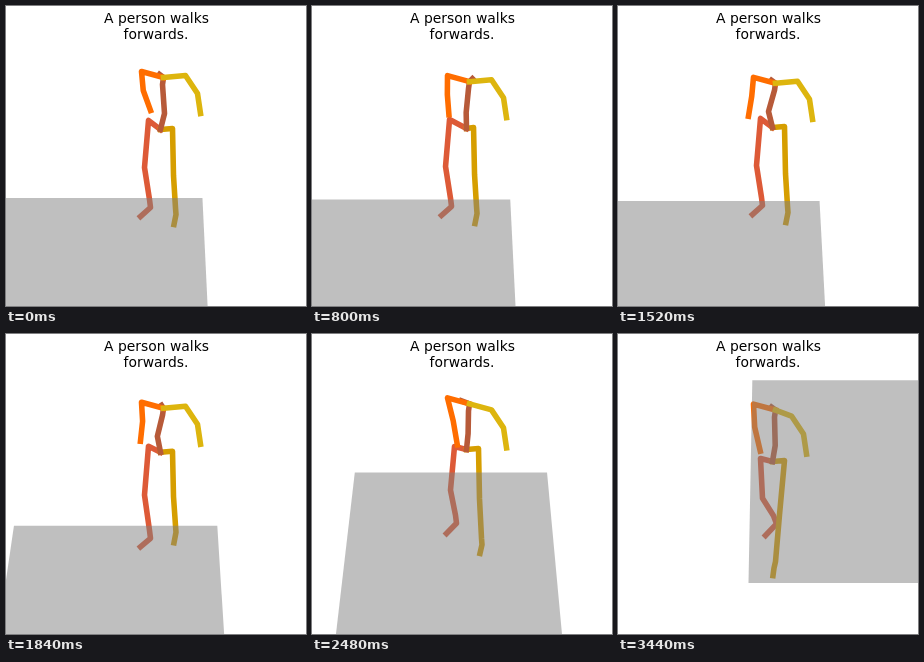
Recreate the animation shown at these times as an HTML page with a canvas. Size 300 px wide and 300 px high, loop 3.52 s.

```html
<!DOCTYPE html>
<html lang="en">
<head>
<meta charset="utf-8">
<title>Walking figure</title>
<style>
html, body { margin: 0; width: 100%; height: 100%; overflow: hidden; background: #fff; }
canvas { display: block; width: 300px; height: 300px; }
</style>
</head>
<body>
<canvas id="stage" width="300" height="300"></canvas>
<script>
const ctx = document.getElementById('stage').getContext('2d');
const { sin, cos, min, max, PI } = Math;
const LOOP = 3520, STEP = 80;
const SETTLE = 1520, STRIDE = 2160, CYCLE = 1280;

// Standing pose: legs and spine relative to the pelvis, arms to the neck.
const REST = {
  redLeg: [[-12, -9], [-16, 38], [-11, 70], [-10, 78], [-20, 87]],
  goldLeg: [[12, -1], [13, 46], [15, 78.5], [15.5, 85], [13.5, 95]],
  orangeArm: [[-22, -6], [-22, 13], [-20, 33]],
  goldArm: [[22, -2], [34, 16], [37, 36]]
};
// How far each leg joint, hip to toe, swings in one stride.
const SWING = [[0, 0], [6, 8], [12, 24], [14, 24], [13, 21]];
const LAG = 0.44;

const VANISH = { x: 150, y: -781 };
const FLOOR_WIDTH = 226, FLOOR_DEPTH = 0.000238;

const clamp = u => min(1, max(0, u));
const mix = (a, b, u) => a + (b - a) * u;
const ease = (t, from, to) => {
  const u = clamp((t - from) / (to - from));
  return u * u * (3 - 2 * u);
};

function motion(t) {
  return {
    t,
    phase: 2 * PI * (t - STRIDE) / CYCLE,
    walk: ease(t, SETTLE, STRIDE),
    sway: t < SETTLE ? sin(PI * t / SETTLE) ** 2 : 0,
    bend: 4 * cos(PI * t / SETTLE),
    stoop: 8 * sin(PI * t / LOOP),
    reach: 8 * ease(t, 1900, 2500)
  };
}

const shift = (points, [ox, oy]) => points.map(([x, y]) => [x + ox, y + oy]);

function leg(rest, m, phase, drop) {
  return rest.map(([x, y], i) => {
    const [dx, dy] = SWING[i];
    return [
      x - 5 * m.sway + m.walk * dx * cos(phase),
      y + m.walk * (drop - dy * cos(phase - LAG))
    ];
  });
}

function figure(m) {
  const { phase, walk, sway, bend, stoop, reach } = m;
  const root = [154, mix(123 - 2 * m.t / SETTLE, 121 + 6 * cos(2 * phase), walk)];
  const spine = shift([
    [0, 0],
    [bend, -16],
    [2, stoop - 45],
    [3, stoop - 52],
    [7 * sway - 1 - 4 * walk * sin(phase), stoop - 55]
  ], root);
  const neck = spine[3];
  const orangeArm = REST.orangeArm.map(([x, y], i) => {
    const swing = i ? 5 * walk * (1 - cos(phase)) : 0;
    return [x + swing + 0.44 * bend * i * i, y + reach * i / 2];
  });
  const goldArm = REST.goldArm.map(([x, y]) => [x - 6 * walk * cos(phase), y + reach]);
  return [
    ['#dd5a37', [root, ...shift(leg(REST.redLeg, m, phase, 6), root)]],
    ['#d69e00', [root, ...shift(leg(REST.goldLeg, m, phase + PI, 0), root)]],
    ['#b75a39', spine],
    ['#ff6d00', [neck, ...shift(orangeArm, neck)]],
    ['#ddb50e', [neck, ...shift(goldArm, neck)]]
  ];
}

// Perspective floor sliding towards the viewer and to the right.
function floorCorners({ t, phase, walk }) {
  const ramp = 476, u = clamp((t - STRIDE + ramp) / ramp);
  const travel = ramp * u * u / 2 + max(0, t - STRIDE);
  const farY = 192 + 0.002 * min(t, SETTLE) - 0.098 * travel - 1.8 * walk * (1 - cos(phase));
  const far = farY - VANISH.y;
  const near = 1 / (1 / far - FLOOR_DEPTH);

  const drift = max(0, t - 1200);
  const right = 201.6 + 2.4 * min(1, t / 1000) + 3.02e-5 * drift * drift
    - 3.5 * walk * sin(phase);
  const left = right - FLOOR_WIDTH;
  const at = (x, d) => [VANISH.x + (x - VANISH.x) * d / (300 - VANISH.y), VANISH.y + d];
  return [at(left, far), at(right, far), at(right, near), at(left, near)];
}

function trace(points) {
  ctx.beginPath();
  points.forEach(([x, y]) => ctx.lineTo(x, y));
}

function draw(t) {
  const m = motion(t);
  ctx.fillStyle = '#fff';
  ctx.fillRect(0, 0, 300, 300);

  ctx.save();
  ctx.translate(0.5, 0.5);
  ctx.lineWidth = 5.56;
  ctx.lineCap = 'square';
  ctx.lineJoin = 'round';
  for (const [color, points] of figure(m)) {
    ctx.strokeStyle = color;
    trace(points);
    ctx.stroke();
  }
  ctx.restore();

  trace(floorCorners(m));
  ctx.fillStyle = 'rgba(128, 128, 128, 0.5)';
  ctx.fill();

  ctx.fillStyle = '#000';
  ctx.font = '13.89px "DejaVu Sans", sans-serif';
  ctx.textAlign = 'center';
  ctx.fillText('A person walks', 150.5, 17);
  ctx.fillText('forwards.', 150, 33);
}

const start = performance.now();
function tick() {
  const t = (performance.now() - start) % LOOP;
  draw(Math.floor(t / STEP) * STEP);
  requestAnimationFrame(tick);
}
tick();
</script>
</body>
</html>
```
